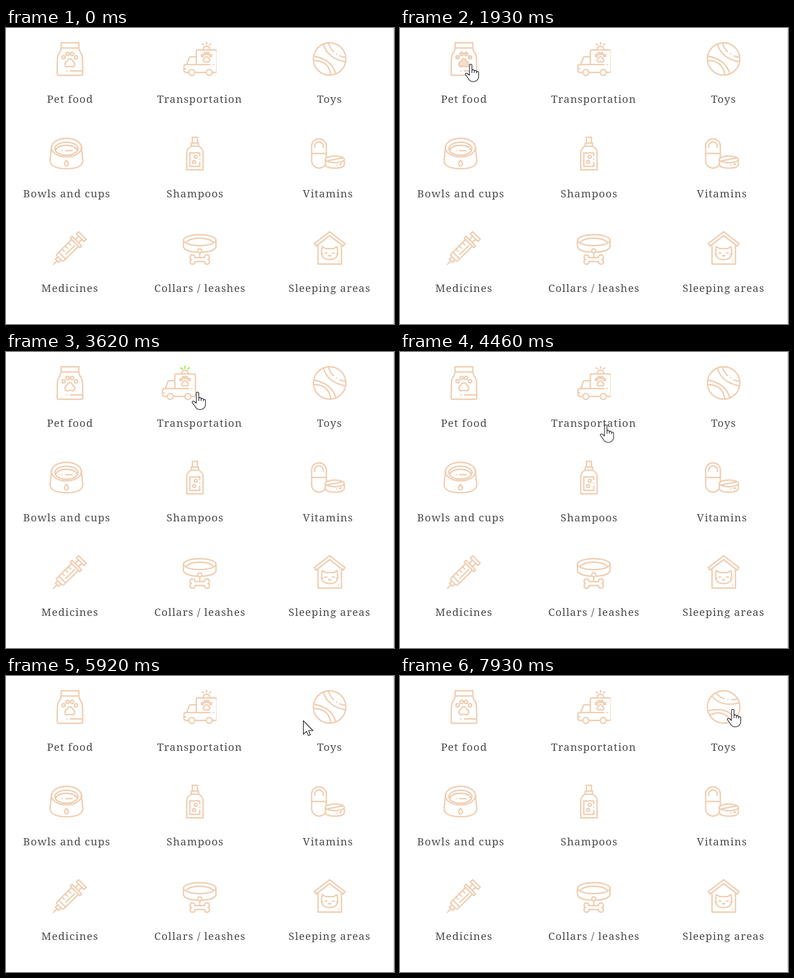
Write an HTML page that moves like this. It is 687 px wide and 526 px high and loops after 8000 ms.

```html
<!DOCTYPE html>
<html lang="en">
<head>
<meta charset="utf-8">
<title>Pet supplies</title>
<style>
html, body { margin: 0; width: 100%; height: 100%; overflow: hidden; background: #fff; }
svg { display: block; width: 687px; height: 526px; }
.icons { fill: none; stroke: #efcdb0; stroke-width: 2.4; stroke-linecap: round; stroke-linejoin: round; }
.solid { fill: #fff; }
#paw * { vector-effect: non-scaling-stroke; }
.labels { font: 18.8px "Noto Serif", serif; letter-spacing: 1.15px; fill: #4b4b4b; text-anchor: middle; }
.pointer { fill: #fff; stroke: #111; stroke-width: 1.1; stroke-linejoin: round; }

.pointer, .arrow, .hand, .fill, .van, .lamp, .ball { animation: 8s linear infinite; }
.pointer { animation-name: move; }
.arrow { animation-name: arrow; animation-timing-function: step-end; }
.hand { animation-name: hand; animation-timing-function: step-end; }
.fill { animation-name: fill; fill: #efcdb0; }
.van { animation-name: drive; }
.lamp { animation-name: lamp; animation-timing-function: step-end; stroke: #a4ee5c; }
.blink { animation: blink .5s step-end infinite; }
.ball { animation-name: roll; transform-origin: 573px 55px; }

@keyframes move {
  0%, 1.74% { opacity: 0; transform: translate(444px, 403px); }
  1.75% { opacity: 1; transform: translate(444px, 403px); }
  10.4%, 12.2% { transform: translate(104px, 66px); }
  14.4%, 16.2% { transform: translate(116px, 80px); }
  19.1%, 21.2% { transform: translate(182px, 76px); }
  24.1%, 28.9% { transform: translate(125px, 64px); }
  37% { transform: translate(335px, 70px); }
  39.4%, 51.9% { transform: translate(339px, 71px); }
  55.7% { transform: translate(364px, 129px); }
  56.7%, 58.6% { transform: translate(366px, 134px); }
  63% { transform: translate(345px, 72px); }
  69.2% { transform: translate(350px, 72px); }
  74%, 75% { transform: translate(526px, 79px); }
  78.9%, 79.8% { transform: translate(570px, 76px); }
  86.4%, 88.6% { transform: translate(664px, 144px); }
  98.1%, 100% { opacity: 1; transform: translate(589px, 59px); }
}
@keyframes arrow {
  0%, 17.3%, 30.3%, 70.2%, 82.2% { opacity: 1; }
  9.5%, 23.3%, 36.1%, 76.5%, 95% { opacity: 0; }
}
@keyframes hand {
  0%, 17.3%, 30.3%, 70.2%, 82.2% { opacity: 0; }
  9.5%, 23.3%, 36.1%, 76.5%, 95% { opacity: 1; }
}
@keyframes fill {
  0%, 9.5%, 19.1%, 23%, 33%, 100% { fill-opacity: 0; }
  11.5%, 17.3%, 24.1%, 30.3% { fill-opacity: .65; }
}
@keyframes drive {
  0%, 36.1%, 55.4%, 62%, 73.8%, 100% { transform: none; animation-timing-function: ease; }
  42%, 52.4%, 67%, 70.2% { transform: translateX(-38px); animation-timing-function: ease; }
}
@keyframes lamp {
  0%, 52.4%, 70.2% { opacity: 0; }
  36.1%, 62% { opacity: 1; }
}
@keyframes blink {
  0% { opacity: 1; }
  50% { opacity: 0; }
}
@keyframes roll {
  0%, 76.5%, 86.4%, 95% { transform: rotate(0deg); }
  82.2%, 100% { transform: rotate(-30deg); }
}
</style>
</head>
<body>
<svg viewBox="0 0 687 526">
  <defs>
    <clipPath id="road"><rect x="270" y="20" width="103" height="70"/></clipPath>
    <g id="paw">
      <circle cx="-11" cy="-5" r="2.9"/><circle cx="-4" cy="-11" r="2.9"/>
      <circle cx="4" cy="-11" r="2.9"/><circle cx="11" cy="-5" r="2.9"/>
      <path d="M0-2.500c4 0 4 4 6.500 5.500c4 3 2 9-2 9c-2 0-2.500-1-4.500-1s-2.500 1-4.500 1c-4 0-6-6-2-9c2.500-1.500 2.500-5.500 6.500-5.500z"/>
    </g>
    <path id="rays" d="M355 25.500v3.500M347.500 28l2.300 2.300M362.500 28l-2.300 2.300"/>
    <!-- one half of the ball's seams -->
    <path id="seam" d="M562 28.500Q569 54 600.500 60"/>
  </defs>

  <path d="M686.500 0V526" stroke="#c9c9c9"/>

  <g class="icons">
    <!-- food bag -->
    <path d="M97.500 26.200H129V35.500H97.500ZM97.500 35.500Q97 41 93 46Q91 50 91 55L90.500 81Q90.500 84 93.500 84H133Q136 84 136 81L135.500 55Q135.500 50 133.500 46Q129.500 41 129 35.500M114 76.300H135M107.500 76.300h.1"/>
    <g transform="translate(113 57)"><use href="#paw" class="fill"/></g>

    <!-- van -->
    <g clip-path="url(#road)">
      <g class="van">
        <path d="M323 79H319Q315 79 315 75V69Q315 65 319 65H361M367 65h.1M320 65L324 54Q325 51 328 51H337M337 65V42Q337 39 340 39H370.500Q373.500 39 373.500 42V76Q373.500 79 370.500 79H366M335 79H354M315 72.500h3M349 39V38a6 5.500 0 0 1 12 0V39"/>
        <circle cx="329" cy="79" r="5.300"/><circle cx="360" cy="79" r="5.300"/>
        <use href="#paw" transform="translate(355 52.500) scale(.66)"/>
        <use href="#rays"/>
        <g class="lamp"><use href="#rays" class="blink"/></g>
      </g>
    </g>

    <!-- ball -->
    <circle cx="573" cy="55" r="28.800"/>
    <g class="ball">
      <use href="#seam"/>
      <use href="#seam" transform="rotate(180 573 55)"/>
      <path d="M571 27Q573.500 36 580 42M585.500 46.300h.1M591 49.500Q596 51.500 601 52M575 83Q571 57 545 58"/>
    </g>

    <!-- bowl -->
    <path d="M80.500 211L78 236Q79 250 107 250Q135 250 136 236L133.500 211M88 217Q92 208.500 107 208.500Q122 208.500 126 217M99.500 218h.1M106 218H117M107 235q-3.500 4.500-3.500 6.500a3.500 3.500 0 0 0 7 0q0-2-3.500-6.500z"/>
    <ellipse cx="107" cy="212.500" rx="26.500" ry="16.500"/>
    <ellipse cx="107" cy="214.500" rx="20.500" ry="11.500"/>

    <!-- shampoo -->
    <path d="M330 194.200H339V204.500H330ZM328 204.500H341V210H328ZM328 210Q320 214 320 222V252H349V222Q349 214 341 210M343 227V222H325.500V246H343V239M343 233h.1"/>
    <circle cx="336" cy="229" r="2.600"/><circle cx="333" cy="238" r="2.600"/>

    <!-- vitamins -->
    <rect x="541.200" y="197" width="26" height="52" rx="13"/>
    <path d="M541 223H567M546.500 212V210a7.700 7.700 0 0 1 15.400 0V212"/>
    <path class="solid" d="M565.500 233.500V243Q567 249 582 249Q598 249 599 243V233.500"/>
    <ellipse class="solid" cx="582.200" cy="233.500" rx="16.800" ry="6"/>
    <path d="M570 236L595 231M586 243.500h.1M591 242.500l3-1"/>

    <!-- syringe -->
    <g transform="translate(113 391) rotate(45)">
      <path d="M0 41V32M-4 26V32H4V26M-8.500-13V23Q-8.500 26-5.500 26H5.500Q8.500 26 8.500 23V-13M-12-17.500H12V-13H-12ZM-4-17.500V-26M4-17.500V-26M-9.500-31.500H9.500V-26H-9.500ZM-8.500-5H-2.500M-8.500 3H-2.500M-8.500 11H-2.500M3-9V13M-8.500 19H8.500"/>
    </g>

    <!-- collar -->
    <ellipse cx="343" cy="377" rx="28.800" ry="9.700"/>
    <path d="M314.200 377V389Q317 397 338 398.500M371.800 377V389Q369 397 348 398.500M319 380.500Q326 373.500 343 373.500Q360 373.500 367 380.500"/>
    <circle cx="343" cy="396" r="3.600"/>
    <path class="solid" d="M334.500 408a4.300 4.300 0 1 0-6 3.500a4.300 4.300 0 1 0 6 3.500H351.500a4.300 4.300 0 1 0 6-3.500a4.300 4.300 0 1 0-6-3.500Z"/>
    <path d="M343 400V407"/>

    <!-- pet house -->
    <path d="M573 362L600 383L597 387.500L573 369L549 387.500L546 383ZM552.500 386V419.500H594V386"/>
    <path d="M560 388.500L566 392H580L586 388.500Q588.500 400 586.500 405Q583 411.500 573 411.500Q563 411.500 559.500 405Q557.500 400 560 388.500ZM565 400h3M578 400h3M571 404l2 1.500l2-1.500M559 402h2M585 402h2M589 414.500h.1"/>
  </g>

  <g class="labels">
    <text x="113.500" y="133">Pet food</text>
    <text x="343" y="133">Transportation</text>
    <text x="573" y="133">Toys</text>
    <text x="107.700" y="301">Bowls and cups</text>
    <text x="335" y="301">Shampoos</text>
    <text x="570.300" y="301">Vitamins</text>
    <text x="113.200" y="469">Medicines</text>
    <text x="343.500" y="469">Collars / leashes</text>
    <text x="573" y="469">Sleeping areas</text>
  </g>

  <g class="pointer">
    <path class="arrow" d="M.5.5V24.500L6 19.300L9.500 27L13 25.500L9.700 18H17.500Z"/>
    <path class="hand" d="M-2 2.500A2.200 2.200 0 0 1 2.400 2.500V11Q5 8.500 6.400 11.500V12.500Q9 10 10.400 13V14Q13.500 12 14.300 15.500V21C14.300 28 9.500 31.500 5 31.500C-1 31.500-3 28-5 24.500L-9.500 18.500Q-9.500 15.500-6 16.500L-2 20ZM2.400 11V16M6.400 12V16M10.400 13.500V16.500"/>
  </g>
</svg>
</body>
</html>
```
